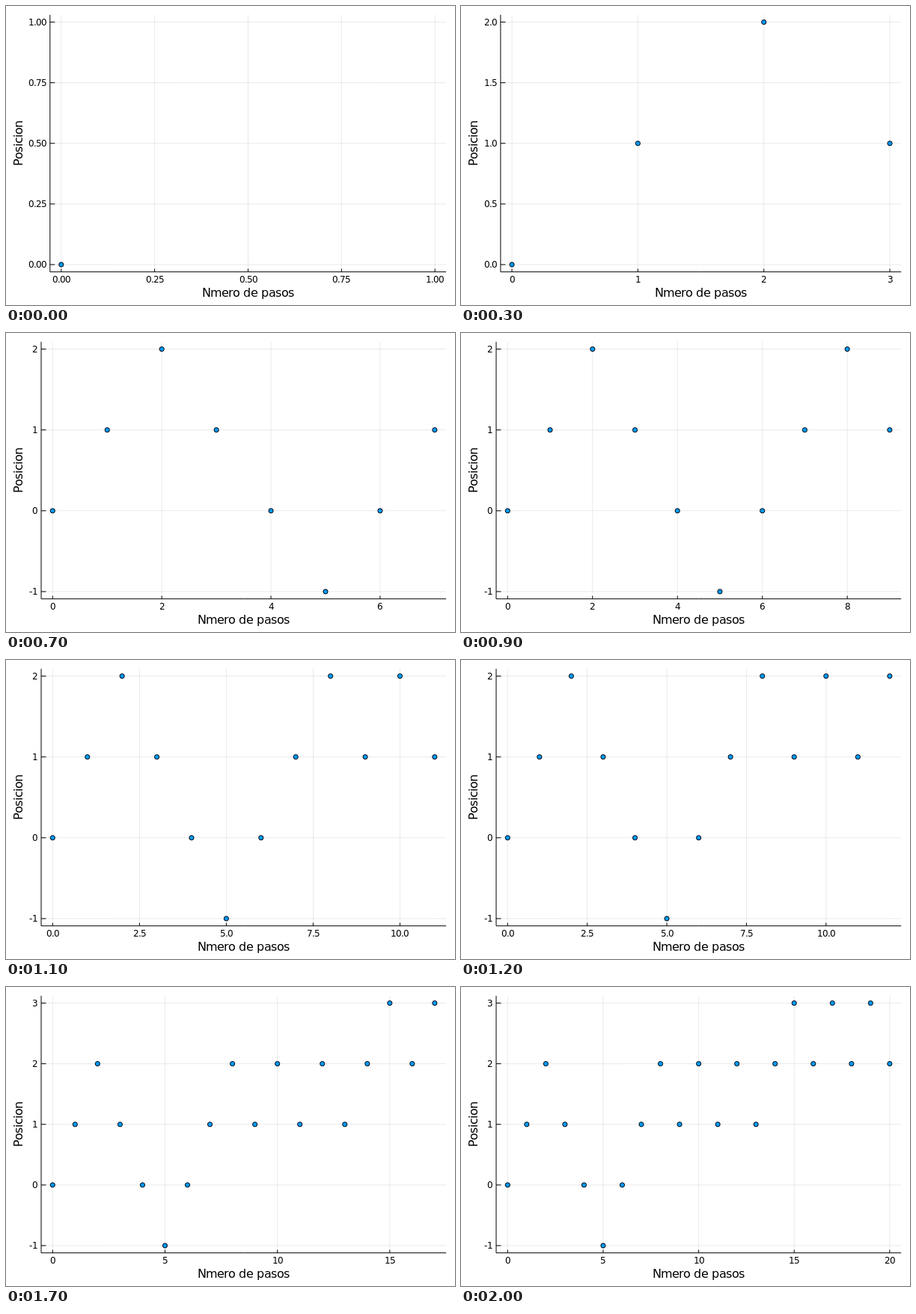
Write an HTML page with a canvas that moves like this. It is 600 by 400 pixels and loops after 2.1 s.

```html
<!DOCTYPE html>
<html lang="es">
<head>
<meta charset="utf-8">
<title>Caminata aleatoria</title>
<style>
  html, body { margin: 0; width: 100%; height: 100%; overflow: hidden; background: #fff; }
  canvas { display: block; }
</style>
</head>
<body>
<canvas id="plot" width="600" height="400"></canvas>
<script>
const ctx = document.getElementById('plot').getContext('2d');
const FONT = '"DejaVu Sans", sans-serif';
const GRID = 'rgba(0, 0, 0, .085)';
const STEP_MS = 100;
const TOP = 11.8, RIGHT = 588.2, BOTTOM = 355.7;
const walk = [0, 1, 2, 1, 0, -1, 0, 1, 2, 1, 2, 1, 2, 1, 2, 3, 2, 3, 2, 3, 2];
// Tick spacing on the x axis for each number of steps; 5 afterwards
const xSteps = [.25, .25, .5, 1, 1, 1, 1, 2, 2, 2, 2.5, 2.5, 2.5, 2, 2.5];

const decimals = step => (String(step).split('.')[1] || '').length;

// Maps data to pixels with a 3% margin at both ends
function scale(lo, hi, from, to) {
  const pad = .03 * (hi - lo);
  return v => from + (v - lo + pad) / (hi - lo + 2 * pad) * (to - from);
}

function ticks(lo, hi, step) {
  const list = [];
  for (let v = lo; v <= hi; v += step) list.push(v);
  return list;
}

function line(x1, y1, x2, y2, color = '#000') {
  ctx.strokeStyle = color;
  ctx.beginPath();
  ctx.moveTo(x1, y1);
  ctx.lineTo(x2, y2);
  ctx.stroke();
}

// Sets text on whole pixels, each advance rounded down; align 0.5 centres, 1 ends at x
function text(str, x, y, size, align) {
  ctx.font = `${size}px ${FONT}`;
  ctx.fillStyle = '#000';
  const advances = [...str].map(c => Math.floor(ctx.measureText(c).width));
  const width = advances.reduce((sum, a) => sum + a, 0);
  let pen = Math.round(x - align * width);
  [...str].forEach((c, i) => {
    ctx.fillText(c, pen, Math.round(y));
    pen += advances[i];
  });
}

function draw(n) {
  const points = walk.slice(0, n + 1);
  const xMax = Math.max(n, 1);
  const yMin = Math.min(...points), yMax = Math.max(...points, 1);
  const xStep = xSteps[n] || 5;
  const yStep = n < 2 ? .25 : n < 5 ? .5 : 1;
  const xDigits = decimals(xStep), yDigits = decimals(yStep);

  // The left margin grows with the longest y label
  const left = 47 + 5.9 * yDigits;
  const x = scale(0, xMax, left, RIGHT);
  const y = scale(yMin, yMax, BOTTOM, TOP);
  const xTicks = ticks(0, xMax, xStep), yTicks = ticks(yMin, yMax, yStep);

  ctx.fillStyle = '#fff';
  ctx.fillRect(0, 0, 600, 400);
  ctx.lineWidth = 1;

  for (const v of xTicks) line(x(v), TOP, x(v), BOTTOM, GRID);
  for (const v of yTicks) line(left, y(v), RIGHT, y(v), GRID);

  line(left, TOP, left, BOTTOM);
  line(left, BOTTOM, RIGHT, BOTTOM);
  for (const v of xTicks) {
    line(x(v), BOTTOM, x(v), BOTTOM - 4.1);
    text(v.toFixed(xDigits), x(v), 370, 12, .5);
  }
  for (const v of yTicks) {
    line(left, y(v), left + 6.5, y(v));
    text(v.toFixed(yDigits), left - 5, y(v) + 4.3, 12, 1);
  }

  text('Nmero de pasos', (left + RIGHT) / 2, 389, 16, .5);
  ctx.save();
  ctx.translate(22, Math.round((TOP + BOTTOM) / 2));
  ctx.rotate(-Math.PI / 2);
  text('Posicion', 0, 0, 16, .5);
  ctx.restore();

  ctx.strokeStyle = '#000';
  ctx.fillStyle = '#009afa';
  points.forEach((p, i) => {
    ctx.beginPath();
    ctx.arc(x(i), y(p), 3.1, 0, 2 * Math.PI);
    ctx.fill();
    ctx.stroke();
  });
}

function tick() {
  draw(Math.floor(performance.now() / STEP_MS) % walk.length);
  requestAnimationFrame(tick);
}
tick();
</script>
</body>
</html>
```
